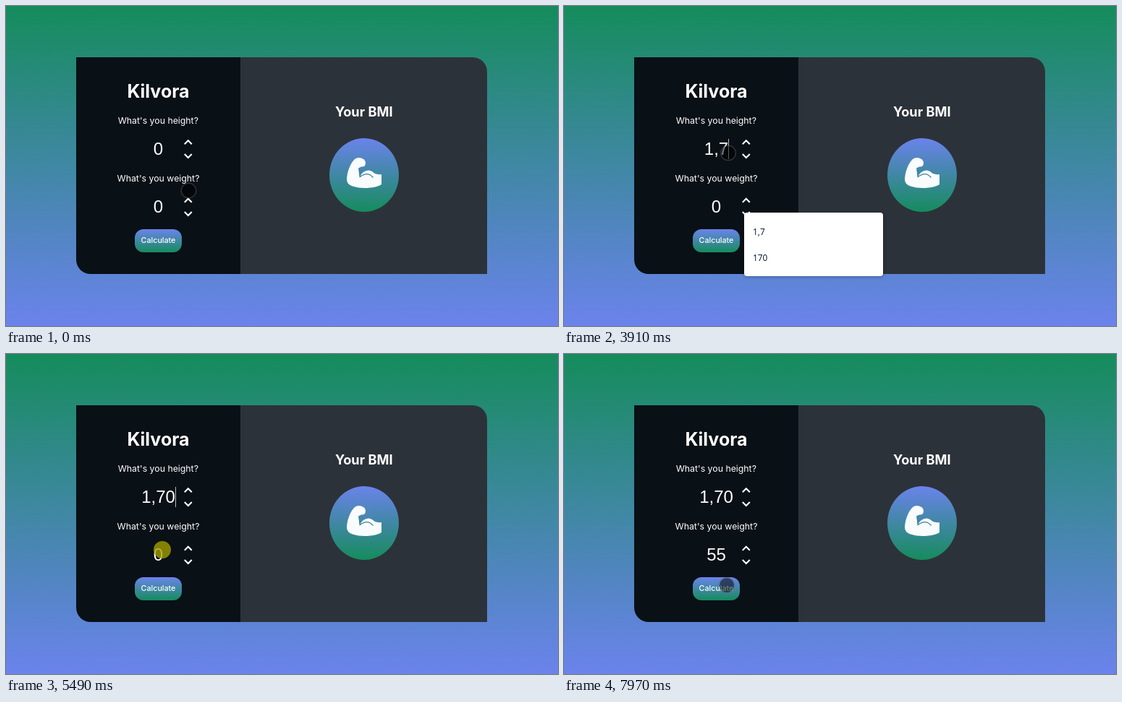
Write an HTML page that moves like this. It is 763x443 px and loops after 8000 ms.

```html
<!DOCTYPE html>
<html lang="en">
<head>
<meta charset="utf-8">
<title>BMI calculator</title>
<style>
  html, body { margin: 0; width: 100%; height: 100%; overflow: hidden; }
  svg { display: block; width: 763px; height: 443px; }
  text { fill: #fff; text-anchor: middle; font-family: Inter, Roboto, sans-serif; }
  .label { font-size: 12.3px; }
  .value { font: 24px "Liberation Sans", Arial, sans-serif; }
  .chevrons { fill: none; stroke: #fff; stroke-width: 2.1; }
  .caret { fill: #b8babc; }
  .popup rect { fill: #fff; filter: drop-shadow(0 1px 2px rgba(0, 0, 0, .3)); }
  .popup text { fill: #14213d; text-anchor: start; font: 500 11.9px "Noto Sans", "Open Sans", sans-serif; }
</style>
</head>
<body>
<svg viewBox="0 0 763 443">
  <defs>
    <linearGradient id="page" x2="0" y2="1">
      <stop stop-color="#158c5c"/><stop offset="1" stop-color="#6b83ec"/>
    </linearGradient>
    <linearGradient id="accent" x2="0" y2="1">
      <stop stop-color="#6b83ec"/><stop offset="1" stop-color="#158c5c"/>
    </linearGradient>
  </defs>

  <rect width="763" height="443" fill="url(#page)"/>
  <path d="M324 71H645a20 20 0 0 1 20 20V371H324Z" fill="#2c3239"/>
  <path d="M97 71H324V371H117a20 20 0 0 1-20-20Z" fill="#091016"/>

  <text x="210.5" y="127" font-size="25" font-weight="700">Kilvora</text>
  <text class="label" x="210.3" y="163">What's you height?</text>
  <text class="label" x="210.5" y="243">What's you weight?</text>
  <path class="chevrons" d="M246.8 191.2l5-5 5 5M246.8 205l5 5 5-5"/>
  <path class="chevrons" d="M246.8 271.7l5-5 5 5M246.8 285l5 5 5-5"/>

  <text class="value" id="height" x="210.5" y="206"></text>
  <text class="value" id="weight" x="210.5" y="286"></text>
  <rect class="caret" id="heightCaret" y="184" width="1" height="28"/>
  <rect class="caret" id="weightCaret" y="264" width="1" height="28"/>

  <rect x="178" y="309" width="65" height="32" rx="12" fill="url(#accent)"/>
  <text x="210.5" y="328.3" font-size="10.7" font-weight="500">Calculate</text>

  <text x="494.7" y="153" font-size="18.2" font-weight="700">Your BMI</text>
  <ellipse cx="495" cy="234" rx="48" ry="51" fill="url(#accent)"/>
  <path fill="#f9fcfc" d="M482 212Q486 209 491 210.5L495 212.5Q498 216 496.5 220Q495.500 223 491.500 222.500Q488 223 487.500 226L489 236.500Q493 228 501 227.500Q506 228 509 231.500Q514 234 519 233V247C512 252 492 254 479 249.500Q471 247 471 240C471.500 229 476 218 482 212Z"/>
  <path fill="none" stroke="#3b819d" stroke-width="1.4" stroke-linecap="round" d="M488 224.500L489.300 236.500Q500 228.500 507 237"/>

  <g class="popup" id="heightPopup">
    <rect x="249" y="286" width="192" height="88" rx="4"/>
    <text x="261" y="317">1,7</text>
    <text x="261" y="353">170</text>
  </g>
  <g class="popup" id="weightPopup">
    <rect x="249" y="392" width="192" height="88" rx="4"/>
    <text x="261" y="423.500">53</text>
  </g>
  <circle id="pointer"/>
</svg>

<script>
const LOOP = 8000;
const CENTER = 210.5;
const $ = id => document.getElementById(id);

// Pointer waypoints: time, x, y
const path = [
  [30, 252.5, 255.5], [220, 233, 240], [400, 202, 216], [510, 194, 205],
  [650, 201, 197], [810, 215, 194.5], [960, 221, 191], [1700, 221, 191],
  [1760, 217, 198], [1850, 220, 203.5], [2080, 220, 203.5], [2110, 224, 203.5],
  [2140, 227, 203.5], [4560, 227, 203.5], [4750, 248, 232], [4950, 262, 276],
  [5080, 252, 299], [5200, 233, 292], [5360, 216, 271], [5840, 216, 271],
  [6000, 221, 276.5], [7640, 221, 276.5], [7800, 222, 292], [7970, 225, 320]
];
const clicks = [[1340, 1440], [5490, 5590]];

// Each edit: time, text; the caret restarts its blink at every edit
const fields = {
  height: { focus: 1340, blur: 5590, edits: [[0, "0"], [2640, ""], [3320, "1"], [3580, "1,"], [3910, "1,7"], [4210, "1,70"]] },
  weight: { focus: 5590, blur: LOOP, edits: [[0, "0"], [6470, ""], [6960, "5"], [7210, "55"]] }
};
const popups = {
  heightPopup: { open: 3350, close: 3910, middle: 330 },
  weightPopup: { open: 6990, close: 7210, middle: 436 }
};

const within = (t, from, to) => t >= from && t < to;

function pointerAt(t) {
  const next = path.findIndex(p => p[0] > t);
  if (next === 0) return path[0].slice(1);
  if (next < 0) return path[path.length - 1].slice(1);
  const a = path[next - 1], b = path[next];
  const k = (t - a[0]) / (b[0] - a[0]);
  return [1, 2].map(i => a[i] + (b[i] - a[i]) * k);
}

function textWidth(text) {
  return [...text].reduce((w, c) => w + (c === "," ? 0.278 : 0.556) * 24, 0);
}

function drawField(name, t) {
  const { focus, blur, edits } = fields[name];
  const [time, text] = edits.filter(e => e[0] <= t).pop();
  const label = $(name), caret = $(name + "Caret");
  if (label.textContent !== text) label.textContent = text;
  const blinkOn = (t - Math.max(time, focus)) % 1000 < 500;
  caret.setAttribute("x", Math.round(CENTER + textWidth(text) / 2 - 0.3));
  caret.setAttribute("visibility", within(t, focus, blur) && blinkOn ? "visible" : "hidden");
}

function drawPopup(id, t) {
  const { open, close, middle } = popups[id];
  const step = Math.max(0, Math.floor((t - close) / 30) * 30);
  const opacity = t < open ? 0 : Math.max(0, 1 - step / 180);
  const scale = 0.95 + 0.05 * opacity;
  $(id).setAttribute("opacity", opacity);
  $(id).setAttribute("transform", `translate(345 ${middle}) scale(${scale}) translate(-345 ${-middle})`);
}

function drawPointer(t) {
  const [x, y] = pointerAt(Math.floor(t / 10) * 10);
  const pressed = clicks.some(c => within(t, ...c));
  const style = pressed
    ? { r: 11.5, fill: "rgba(165,160,0,.78)", stroke: "rgba(165,160,0,.5)" }
    : { r: 10.3, fill: "rgba(0,0,0,.52)", stroke: "rgba(110,110,115,.4)" };
  for (const [key, value] of Object.entries({ cx: x, cy: y, "stroke-width": 1.4, ...style }))
    $("pointer").setAttribute(key, value);
}

function draw(t) {
  Object.keys(fields).forEach(name => drawField(name, t));
  Object.keys(popups).forEach(id => drawPopup(id, t));
  drawPointer(t);
}

const start = performance.now();
function tick() {
  draw((performance.now() - start) % LOOP);
  requestAnimationFrame(tick);
}
tick();
</script>
</body>
</html>
```
